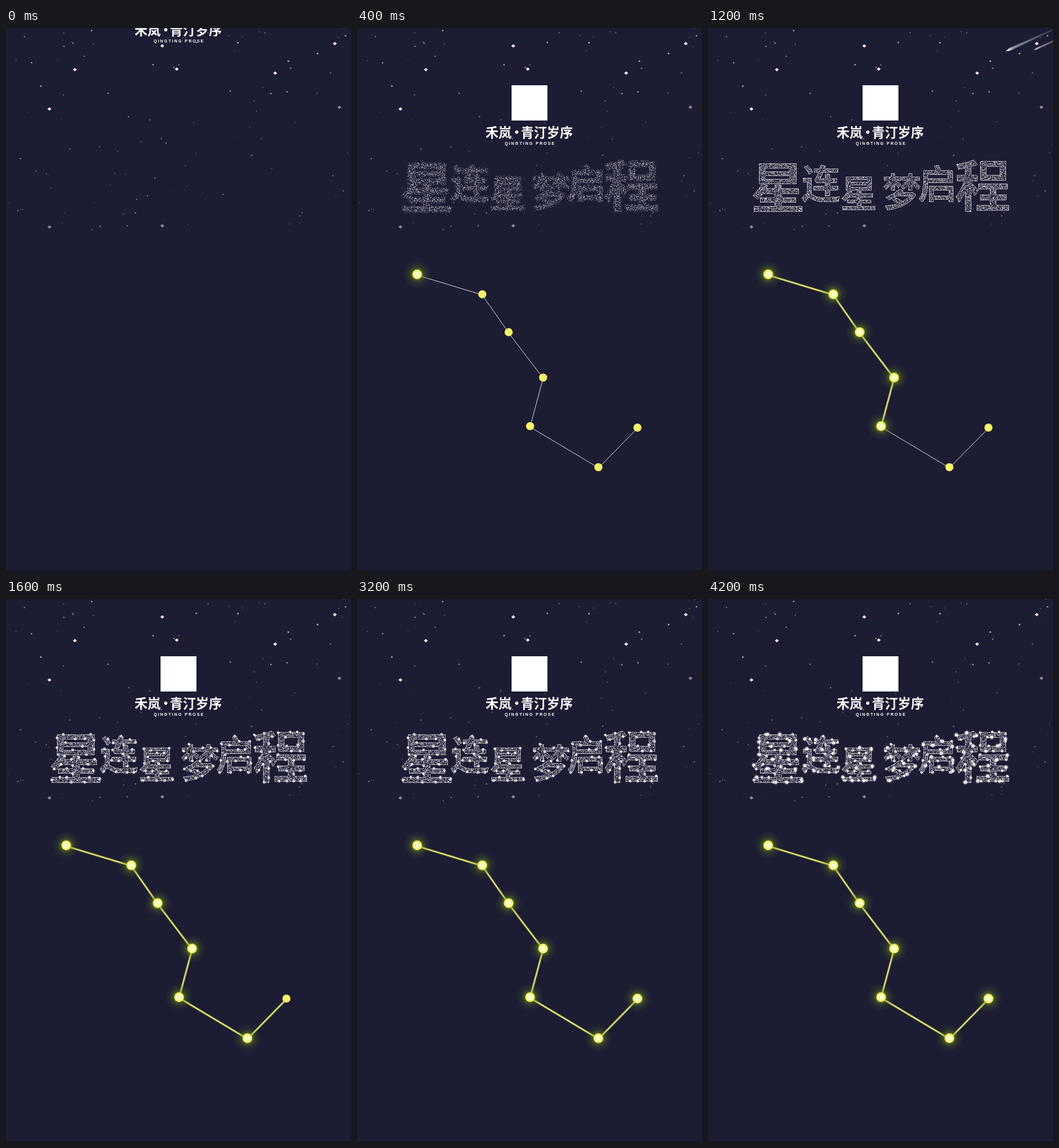
Animation of 596x939 px, one loop 4.4 s. Source, as an HTML page with a canvas:

```html
<!DOCTYPE html>
<html lang="zh-CN">
<head>
<meta charset="utf-8">
<style>
html, body { margin: 0; width: 100%; height: 100%; overflow: hidden; background: #1c1c33; }
canvas { display: block; }
</style>
</head>
<body>
<canvas id="stage" width="596" height="939"></canvas>
<script>
const W = 596, H = 939, LOOP = 4400;
const CJK = '"Noto Sans CJK SC", "Noto Sans CJK", sans-serif';
const ctx = document.getElementById('stage').getContext('2d');

function seeded(seed) {
  return () => (seed = (seed * 16807) % 2147483647) / 2147483647;
}

function layer(paint) {
  const c = document.createElement('canvas');
  c.width = W;
  c.height = H;
  const g = c.getContext('2d', { willReadFrequently: true });
  paint(g);
  return c;
}

function dot(g, x, y, r, fill) {
  g.fillStyle = fill;
  g.beginPath();
  g.arc(x, y, r, 0, 7);
  g.fill();
}

function diamond(g, x, y, r, fill) {
  g.fillStyle = fill;
  g.beginPath();
  g.moveTo(x - r * 1.2, y);
  g.lineTo(x, y - r);
  g.lineTo(x + r * 1.2, y);
  g.lineTo(x, y + r);
  g.fill();
}

function halo(g, x, y, r, ...stops) {
  const grad = g.createRadialGradient(x, y, 0, x, y, r);
  stops.forEach(([at, color]) => grad.addColorStop(at, color));
  dot(g, x, y, r, grad);
}

// Night sky: a few landmark stars over a seeded scatter
const landmarks = [[119, 72], [295, 71], [270, 31], [465, 78], [75, 140], [568, 27], [576, 137], [75, 344], [270, 342]];

const sky = layer(g => {
  g.fillStyle = '#1c1c33';
  g.fillRect(0, 0, W, H);
  g.fillStyle = '#120f22';
  g.fillRect(0, H - 1, W, 1);
  const rnd = seeded(41);
  for (let i = 0; i < 115; i++) {
    const y = rnd() * 350, light = 0.1 + rnd() * (y < 140 ? 0.6 : 0.4);
    dot(g, rnd() * W, y, 0.6 + light * 1.3, `rgba(235,232,228,${light})`);
  }
  for (const [x, y] of landmarks) diamond(g, x, y, 2.9, y < 130 || x < y && y < 200 ? '#fbe0d4' : y > 130 && x > 74 && y !== 140 ? '#8b8a90' : '#fbe0d4');
});

// Title: glyph, centre x, centre y, size
const glyphs = [
  ['星', 120.5, 275, 95], ['连', 195, 269, 68], ['星', 260.5, 285, 65],
  ['梦', 335, 283, 68], ['启', 396, 269, 68], ['程', 474.5, 271.5, 97]
];
const mask = layer(g => {
  g.textAlign = 'center';
  for (const [char, x, y, size] of glyphs) {
    g.font = `900 ${size}px ${CJK}`;
    g.fillText(char, x, y + size * 0.385);
  }
}).getContext('2d').getImageData(0, 0, W, H).data;

const inside = (x, y) => mask[(y * W + x) * 4 + 3] > 110;
const grains = [];
const rnd = seeded(977);
for (let y = 215; y < 330; y++) {
  for (let x = 65; x < 535; x++) {
    if (!inside(x, y)) continue;
    const edge = !(inside(x - 1, y) && inside(x + 1, y) && inside(x, y - 1) && inside(x, y + 1));
    const alpha = edge ? 0.4 + rnd() * 0.45 : rnd() < 0.58 ? 0.15 + rnd() * 0.65 : 0;
    if (alpha) grains.push({ x, y, edge, alpha, dx: rnd() * 2 - 1, dy: rnd() * 2 - 1 });
  }
}

// Random outline points that keep a minimum gap
const rim = grains.filter(p => p.edge);
function spread(gap) {
  const kept = [];
  for (let i = 0; i < 2000; i++) {
    const p = rim[Math.floor(rnd() * rim.length)];
    if (kept.every(q => Math.hypot(p.x - q.x, p.y - q.y) > gap)) kept.push(p);
  }
  return kept;
}
const smallSparks = spread(11), bigSparks = spread(17);

function drawTitle(p) {
  ctx.fillStyle = '#fff';
  for (const q of grains) {
    ctx.globalAlpha = q.alpha * Math.sqrt(p) * (q.edge ? p : 1);
    ctx.fillRect(Math.round(q.x + q.dx * 6 * (1 - p)), Math.round(q.y + q.dy * 6 * (1 - p)), 1, 1);
  }
  ctx.globalAlpha = 1;
}

function drawSparks(list, r) {
  for (const { x, y } of list) {
    halo(ctx, x, y, r, [0, '#fff'], [0.4, 'rgba(255,255,255,.85)'],
      [0.6, 'rgba(255,255,255,.2)'], [1, 'rgba(255,255,255,0)']);
  }
}

function drawLogo(dy) {
  ctx.save();
  ctx.translate(0, dy);
  ctx.fillStyle = '#fff';
  ctx.fillRect(267, 99, 62, 61);
  ctx.font = `bold 22.5px ${CJK}`;
  ctx.fillText('禾岚', 222, 188.5);
  ctx.fillText('青汀岁序', 283, 188.5);
  ctx.textAlign = 'center';
  ctx.fillText('·', 276, 188.5);
  ctx.font = 'bold 7px "Liberation Sans", sans-serif';
  ctx.letterSpacing = '1.9px';
  ctx.fillText('QINGTING PROSE', 299, 201.5);
  ctx.restore();
}

const chain = [[104, 426], [216.5, 460.5], [262, 526], [321.5, 604.5], [299, 688.5], [417, 759.5], [484.5, 691]];

// Links run just below the star centres
function link(i, width, color) {
  const [x1, y1] = chain[i], [x2, y2] = chain[i + 1];
  ctx.lineWidth = width;
  ctx.strokeStyle = color;
  ctx.beginPath();
  ctx.moveTo(x1, y1 + 1.4);
  ctx.lineTo(x2, y2 + 1);
  ctx.stroke();
}

// Stars and links light up in turn along the chain
function drawChain(lit) {
  for (let i = 0; i < 6; i++) {
    if (lit > 2 * i + 1) {
      link(i, 4.5, 'rgba(140,155,40,.3)');
      link(i, 3, '#a3a64c');
      link(i, 1.5, '#eeec80');
    } else link(i, 1, 'rgba(255,255,255,.85)');
  }
  chain.forEach(([x, y], i) => {
    if (lit > 2 * i) {
      halo(ctx, x, y, 25, [0, 'rgba(140,175,20,.7)'], [0.33, 'rgba(125,160,20,.5)'],
        [0.6, 'rgba(95,130,25,.2)'], [1, 'rgba(70,110,30,0)']);
      halo(ctx, x, y, 8.5, [0, '#fffff0'], [0.45, '#fdfcc0'], [0.8, '#f3f274'], [1, '#cfdc38']);
    } else dot(ctx, x, y, 7, '#f6f268');
  });
}

function drawMeteor(x, y, r, alpha) {
  const tx = x + 92, ty = y - 42;
  const grad = ctx.createLinearGradient(x, y, tx, ty);
  grad.addColorStop(0, `rgba(255,255,255,${alpha})`);
  grad.addColorStop(0.12, `rgba(225,225,235,${alpha * 0.6})`);
  grad.addColorStop(1, 'rgba(200,200,220,.1)');
  ctx.fillStyle = grad;
  ctx.beginPath();
  ctx.moveTo(x - 3, y + 1.4);
  ctx.lineTo(x + 4 - r * 0.42, y - 1.8 - r * 0.9);
  ctx.lineTo(tx, ty - 0.7);
  ctx.lineTo(tx, ty + 0.7);
  ctx.lineTo(x + 4 + r * 0.42, y - 1.8 + r * 0.9);
  ctx.fill();
}

function draw(s) {
  ctx.drawImage(sky, 0, 0);
  drawLogo(-59 * Math.max(0, 3 - s));
  if (s >= 2) drawTitle(Math.min(1, (s - 1) / 5));
  if (s >= 16) {
    const level = [1, 2, 1, 0][(s - 16) / 2 % 4];
    if (level) drawSparks(smallSparks, 3.8);
    if (level > 1) drawSparks(bigSparks, 5.5);
  }
  if (s >= 3) drawChain(s <= 14 ? s - 3 : s < 18 ? 12 : 13);
  if (s >= 11 && s <= 14) {
    const k = s - 12;
    drawMeteor(517 - 82 * k, 39 + 37 * k, 2.4, 0.95);
    drawMeteor(565 - 82 * k, 37 + 37 * k, 1.5, 0.8);
  }
}

let start, shown = -1;
function tick(now) {
  start ??= now;
  let s = Math.floor((now - start) % LOOP / 100);
  if (s >= 14) s -= s % 2; // the pace halves once the meteors have passed
  if (s !== shown) draw(shown = s);
  requestAnimationFrame(tick);
}
requestAnimationFrame(tick);
</script>
</body>
</html>
```
